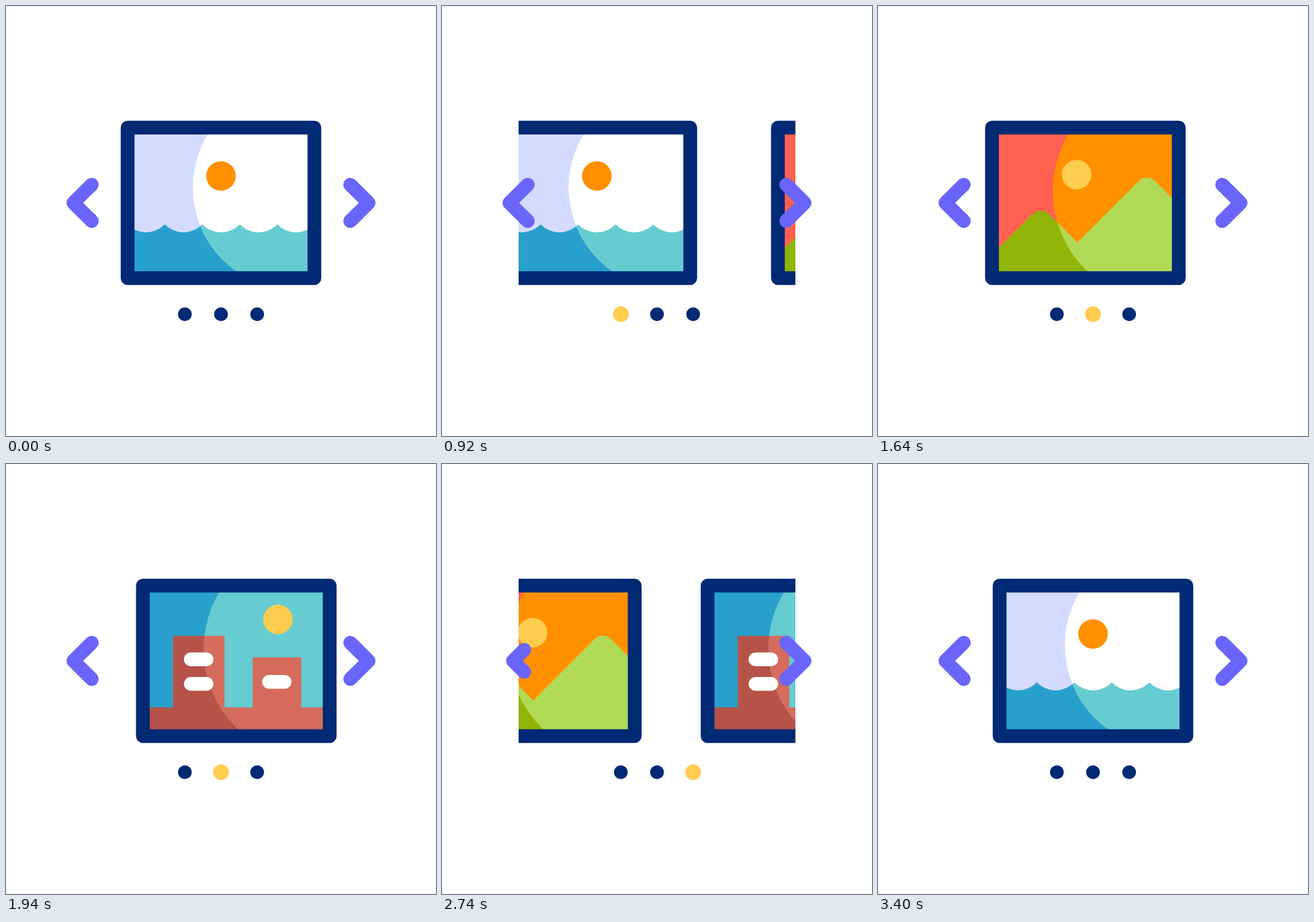
These frames come from a looping animation (640x640 px, 3600 ms). An HTML page with a canvas:

```html
<!DOCTYPE html>
<html lang="en">
<head>
<meta charset="utf-8">
<title>Image carousel</title>
<style>
  html, body { margin: 0; width: 100%; height: 100%; overflow: hidden; background: #fff; }
  canvas { display: block; }
</style>
</head>
<body>
<canvas id="stage" width="640" height="640"></canvas>
<script>
const ctx = document.getElementById('stage').getContext('2d');
const LOOP = 3600;
const STROKE = 20.5;
const NAVY = '#012a74', YELLOW = '#ffcc4f', ORANGE = '#ff9100', VIOLET = '#6a65fb';
const BLUE = '#28a0cd', TEAL = '#67ccd1';

// Distance of each slide from the first one.
const SLIDE_X = [0, 408.5, 795];

// Active dot from the given time on; -1 means none.
const DOT_STEPS = [[0, -1], [200, 0], [1200, 1], [2000, 2], [2800, 1], [3200, 0], [3400, -1]];

// Keyframes [time, value], eased between neighbours.
const SCROLL = [[800, 0], [1200, SLIDE_X[1]], [1600, SLIDE_X[1]], [2000, SLIDE_X[2]],
                [2400, SLIDE_X[2]], [3400, 0]];
const PRESSED = 0.61;
const RIGHT_SIZE = [[400, 1], [600, PRESSED], [800, 1], [1200, 1], [1400, PRESSED], [1600, 1]];
const LEFT_SIZE = [[2000, 1], [2200, PRESSED], [3200, PRESSED], [3400, 1]];

function valueAt(keys, t) {
  if (t <= keys[0][0]) return keys[0][1];
  for (let i = 1; i < keys.length; i++) {
    const [t0, a] = keys[i - 1], [t1, b] = keys[i];
    if (t < t1) {
      const u = (t - t0) / (t1 - t0);
      return a + (b - a) * u * u * (3 - 2 * u);
    }
  }
  return keys[keys.length - 1][1];
}

function rect(color, x0, y0, x1, y1) {
  ctx.fillStyle = color;
  ctx.fillRect(x0, y0, x1 - x0, y1 - y0);
}

function disc(color, x, y, r) {
  ctx.fillStyle = color;
  ctx.beginPath();
  ctx.arc(x, y, r, 0, Math.PI * 2);
  ctx.fill();
}

function pill(x0, x1, y) {
  ctx.strokeStyle = '#fff';
  ctx.lineWidth = 20.5;
  ctx.lineCap = 'round';
  ctx.beginPath();
  ctx.moveTo(x0 + 10.25, y);
  ctx.lineTo(x1 - 10.25, y);
  ctx.stroke();
}

function closeAtBottom(color) {
  ctx.lineTo(460, 405);
  ctx.lineTo(180, 405);
  ctx.fillStyle = color;
  ctx.fill();
}

function sea(sky, water) {
  const period = 55.85, r = 38.4, a = 0.758;
  rect(sky, 180, 180, 460, 405);
  ctx.beginPath();
  for (let i = 0; i < 5; i++) {
    ctx.arc(208.4 + i * period, 298.5, r, Math.PI - a, a, true);
  }
  closeAtBottom(water);
}

function hills(sky, grass) {
  rect(sky, 180, 180, 460, 405);
  ctx.beginPath();
  ctx.moveTo(180, 371);
  ctx.arcTo(253.5, 297.5, 308, 352, 17.5);
  ctx.lineTo(308, 352);
  ctx.arcTo(411.5, 248.5, 460, 297, 17);
  ctx.lineTo(460, 297);
  closeAtBottom(grass);
}

function city(sky, brick) {
  rect(sky, 180, 180, 460, 405);
  rect(brick, 180, 362.3, 460, 405);
  rect(brick, 225.8, 255.7, 302.5, 363);
  rect(brick, 344.4, 287.8, 416.6, 363);
}

const slides = [
  {
    scene: sea, shade: ['#d3dcfe', BLUE], light: ['#fff', TEAL], lens: [430, 270, 152],
    details() { disc(ORANGE, 320, 253, 22); }
  },
  {
    scene: hills, shade: ['#ff6150', '#90b508'], light: [ORANGE, '#b1da54'], lens: [437, 275, 165.5],
    details() { disc(YELLOW, 307, 251, 22); }
  },
  {
    scene: city, shade: [BLUE, '#b55348'], light: [TEAL, '#d56c5d'], lens: [437, 275, 165.5],
    details() {
      disc(YELLOW, 382, 231.3, 22);
      pill(242, 286, 290.8);
      pill(242, 286, 327.2);
      pill(358.5, 402.3, 324.2);
    }
  }
];

function drawSlide(slide, x) {
  ctx.save();
  ctx.translate(x, 0);

  ctx.save();
  ctx.beginPath();
  ctx.rect(185, 185, 270, 216);
  ctx.clip();
  slide.scene(...slide.shade);
  ctx.save();
  ctx.beginPath();
  ctx.arc(...slide.lens, 0, Math.PI * 2);
  ctx.rect(slide.lens[0], 180, 100, 230);
  ctx.clip();
  slide.scene(...slide.light);
  ctx.restore();
  slide.details();
  ctx.restore();

  ctx.strokeStyle = NAVY;
  ctx.lineWidth = STROKE;
  ctx.lineJoin = 'round';
  ctx.strokeRect(181, 181, 278, 224);
  ctx.restore();
}

// dir is -1 for the left arrow and 1 for the right one.
function drawArrow(x, dir, size) {
  const dx = 13.7 * size * dir, dy = 27.1 * size, y = 293;
  ctx.strokeStyle = VIOLET;
  ctx.lineWidth = STROKE;
  ctx.lineCap = ctx.lineJoin = 'round';
  ctx.beginPath();
  ctx.moveTo(x - dx, y - dy);
  ctx.lineTo(x + dx, y);
  ctx.lineTo(x - dx, y + dy);
  ctx.stroke();
}

function draw(t) {
  rect('#fff', 0, 0, 640, 640);

  const scroll = valueAt(SCROLL, t);
  ctx.save();
  ctx.beginPath();
  ctx.rect(114, 160, 412, 270);
  ctx.clip();
  slides.forEach((slide, i) => drawSlide(slide, SLIDE_X[i] - scroll));
  ctx.restore();

  drawArrow(114, -1, valueAt(LEFT_SIZE, t));
  drawArrow(526, 1, valueAt(RIGHT_SIZE, t));

  const active = DOT_STEPS.filter(([start]) => start <= t).pop()[1];
  for (let i = 0; i < 3; i++) {
    const on = i === active;
    disc(on ? YELLOW : NAVY, 266.2 + i * 53.8, 458.8, on ? 11.7 : 10.3);
  }
}

const start = performance.now();
function tick() {
  draw((performance.now() - start) % LOOP);
  requestAnimationFrame(tick);
}
tick();
</script>
</body>
</html>
```
